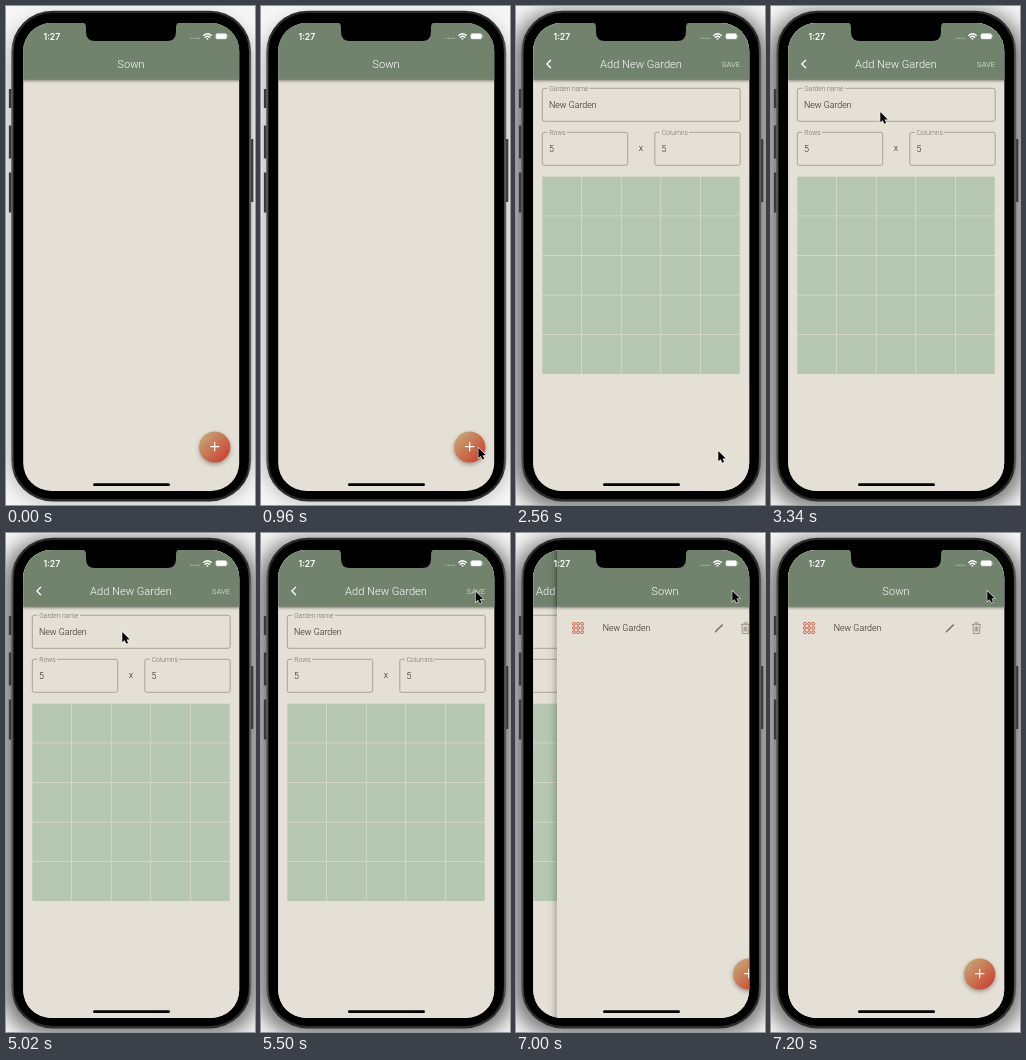
An HTML page for the animation above (8 s loop, 249x499 px).

```html
<!DOCTYPE html>
<html lang="en">
<head>
<meta charset="utf-8">
<title>Garden planner</title>
<style>
  html, body { margin: 0; width: 100%; height: 100%; overflow: hidden; background: #f6f6f6; }
  svg { display: block; width: 249px; height: 499px; }
  text { font: 300 8.86px Roboto, sans-serif; fill: #24231f; }
  .title { font-size: 11.1px; fill: #fff; text-anchor: middle; }
  .label { font-size: 6.65px; fill: #6f6b5e; }
  .save { font-size: 7.75px; fill: #f0f3ee; }
  .time { font: 600 8.6px Inter, sans-serif; fill: #fff; }
  .field { fill: none; stroke: #8d887a; stroke-width: .7; }
  .line { fill: none; stroke: #fff; stroke-linecap: round; }
  .soft { filter: blur(10px); }
  .fab { filter: drop-shadow(0 2px 2px #0005); }
  .bar { filter: drop-shadow(0 1px 1.4px #0008); }
</style>
</head>
<body>
<svg viewBox="0 0 249 499">
  <defs>
    <clipPath id="screen"><rect x="17.2" y="17" width="216" height="468" rx="28"/></clipPath>
    <linearGradient id="warm" x1=".08" y1=".08" x2=".86" y2=".86">
      <stop stop-color="#c6a877"/><stop offset="1" stop-color="#cb4632"/>
    </linearGradient>
    <linearGradient id="edge">
      <stop stop-opacity="0"/><stop offset=".5" stop-opacity=".03"/><stop offset="1" stop-opacity=".2"/>
    </linearGradient>
    <linearGradient id="metal">
      <stop stop-color="#666"/><stop offset=".015" stop-color="#2c2c2c"/>
      <stop offset=".985" stop-color="#2c2c2c"/><stop offset="1" stop-color="#666"/>
    </linearGradient>
    <g id="sheet">
      <rect x="17" y="17" width="217" height="469" fill="#e5e0d5"/>
      <rect class="bar" x="17" y="17" width="217" height="56.5" fill="#71836c"/>
    </g>
    <g id="home">
      <use href="#sheet"/>
      <text class="title" x="125" y="62.2">Sown</text>
      <circle class="fab" cx="208.7" cy="441" r="15.6" fill="url(#warm)"/>
      <path class="line" d="M204.5 440.6h8.4M208.7 436.4v8.4" stroke-width="1.2"/>
    </g>
  </defs>

  <rect class="soft" id="calm" x="4" y="14" width="241" height="480" rx="42" fill-opacity=".3"/>
  <rect class="soft" id="focus" x="-3" y="6" width="255" height="496" rx="44" fill-opacity=".55"/>

  <path d="M4.6 83v19M4.6 119.5v33M4.6 166.5v40M245.6 133v63" stroke="#383838" stroke-width="3.4"/>
  <rect x="5.2" y="4.7" width="240" height="490.8" rx="41.5" fill="url(#metal)"/>
  <rect x="7.5" y="7" width="235.4" height="486" rx="39"/>

  <g clip-path="url(#screen)">
    <use href="#home"/>
    <g id="add">
      <use href="#sheet"/>
      <path class="line" d="M34.6 54.3l-3.7 3.7 3.7 3.7" stroke-width="1.3"/>
      <text class="title" x="125" y="62">Add New Garden</text>
      <text class="save" id="save" x="205.8" y="60.8">SAVE</text>
      <g id="form"></g>
      <text x="122.8" y="145.3">x</text>
    </g>
    <g id="list">
      <rect x="6" y="17" width="11" height="469" fill="url(#edge)"/>
      <use href="#home"/>
      <g id="dots" fill="none" stroke="#c65640" stroke-width=".9"></g>
      <text x="62.7" y="98">New Garden</text>
      <path d="M174.8 99.4l.6-1.4 6.8-6.7.8.8-6.8 6.7z" fill="#66635a" stroke="#66635a" stroke-width=".3"/>
      <path d="M201 91.4h9M204 91.2v-1.4h3v1.4M202 91.6l.5 8.9h6l.5-8.9M204.2 93.5v5M205.5 93.5v5M206.8 93.5v5" fill="none" stroke="#6c695f" stroke-width=".6"/>
    </g>
    <text class="time" x="37.5" y="33.8">1:27</text>
    <path d="M184.5 32.4h9.5" stroke="#fff" stroke-opacity=".4" stroke-width="1.2" stroke-dasharray="1.6 1"/>
    <path class="line" d="M197.6 29.4q3.9-3.4 7.8 0M199.2 31.2q2.3-2 4.6 0" stroke-width="1.3"/>
    <circle cx="201.5" cy="32.8" r=".9" fill="#fff"/>
    <rect x="209.8" y="27.6" width="11" height="5.5" rx="1.6" fill="#fff" stroke="#c5cdc2" stroke-width=".5"/>
    <path d="M221.9 29.4v1.9" stroke="#c5cdc2" stroke-width=".8"/>
    <path d="M76 16h98q-4 1-4 5v5q0 9-9 9H89q-9 0-9-9v-5q0-4-4-5z"/>
    <rect x="87" y="477.2" width="77" height="2.9" rx="1.45"/>
  </g>
  <g id="cursor">
    <path transform="translate(.3 .9) scale(.84)" d="M0 0v12.4l2.8-2.6 2 4.3 2.1-.9-1.9-4.2h3.9z" stroke="#fff" stroke-width="1.2" paint-order="stroke"/>
  </g>
</svg>
<script>
const $ = id => document.getElementById(id);
const clamp = v => Math.min(1, Math.max(0, v));
const span = (t, from, to) => clamp((t - from) / (to - from));
const show = (id, alpha) => $(id).setAttribute('opacity', alpha);
const move = (id, x, y) => $(id).setAttribute('transform', `translate(${x} ${y})`);

// Outlined input with a gap in the border for its label
function field(x, y, right, gap, label, value) {
  const bottom = y + 33;
  return `<path class="field" d="M${gap} ${y}H${right - 2}q2 0 2 2V${bottom - 2}q0 2-2 2H${x + 2}q-2 0-2-2V${y + 2}q0-2 2-2h3"/>
    <text class="label" x="${x + 7}" y="${y + 2.8}">${label}</text>
    <text x="${x + 6.7}" y="${y + 19.2}">${value}</text>`;
}

let form = field(26.3, 82.3, 224.2, 74, 'Garden name', 'New Garden')
  + field(26.3, 126.3, 111.7, 51, 'Rows', 5)
  + field(138.8, 126.3, 224.2, 173, 'Columns', 5);
for (let i = 0; i < 25; i++) {
  const x = 26.3 + i % 5 * 39.6, y = 170.6 + Math.floor(i / 5) * 39.6;
  form += `<rect x="${x}" y="${y}" width="39" height="39" fill="#b5c7b0"/>`;
}
$('form').innerHTML = form;

let dots = '';
for (let i = 0; i < 9; i++) {
  dots += `<circle cx="${33.9 + i % 3 * 4.2}" cy="${90.8 + Math.floor(i / 3) * 4.2}" r="1.45"/>`;
}
$('dots').innerHTML = dots;

// Pointer stops: time, x, y
const stops = [
  [640, 174, 501], [1040, 222, 434], [1240, 214, 437],
  [2150, 214, 437], [2320, 202, 444], [2560, 202, 444],
  [3060, 109, 105], [3880, 109, 105], [4020, 112, 100],
  [5000, 112, 100], [5020, 116, 98], [5540, 216, 57], [8000, 216, 57]
];

function pointer(t) {
  const n = stops.findIndex(s => s[0] > t);
  if (n < 1) return [174, 520];
  const [a, b] = [stops[n - 1], stops[n]];
  const k = span(t, a[0], b[0]), e = k * k * (3 - 2 * k);
  return [a[1] + (b[1] - a[1]) * e, a[2] + (b[2] - a[2]) * e];
}

// cubic-bezier(.35, .91, .33, .97)
function glide(p) {
  const at = (s, a, b) => 3 * (1 - s) ** 2 * s * a + 3 * (1 - s) * s * s * b + s ** 3;
  let lo = 0, hi = 1;
  for (let i = 0; i < 20; i++) {
    const mid = (lo + hi) / 2;
    if (at(mid, .35, .33) < p) lo = mid; else hi = mid;
  }
  return at(lo, .91, .97);
}

function draw(now) {
  const t = now % 8000;
  const focus = span(t, 1640, 1720);
  show('calm', 1 - focus);
  show('focus', focus);
  show('add', span(t, 2140, 2320));
  $('save').style.fill = t >= 6660 ? '#c3d3de' : '';

  const slide = t >= 7200 ? 1 : glide(span(t, 6822, 7222));
  move('list', 216.5 * (1 - slide), 0);
  show('list', slide > 0 ? 1 : 0);
  move('add', -72 * slide, 0);
  move('cursor', ...pointer(t));
  requestAnimationFrame(draw);
}
requestAnimationFrame(draw);
</script>
</body>
</html>
```
